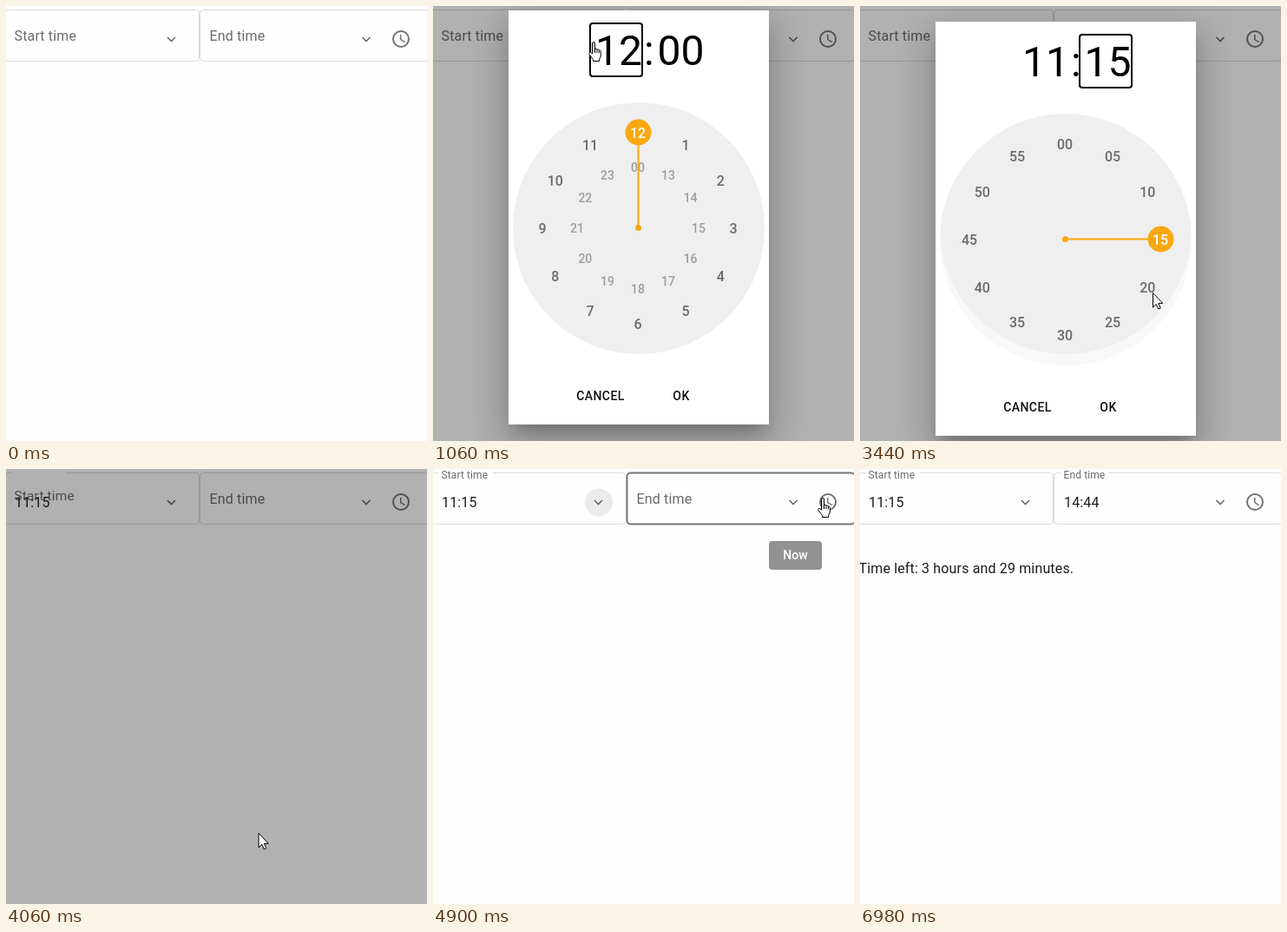
An HTML page that plays this animation: 485 px wide and 501 px high, repeating every 7530 ms.

```html
<!DOCTYPE html>
<html lang="en">
<head>
<meta charset="utf-8">
<title>Time range picker</title>
<style>
  html, body { margin: 0; width: 100%; height: 100%; overflow: hidden; background: #fefefe; }
  svg { display: block; font-family: Roboto, Arial, sans-serif; }
  .mid { text-anchor: middle; font-weight: 500; }
  .body { font-size: 16px; letter-spacing: .15px; fill: #1c1c1c; }
  .label { font-size: 16px; letter-spacing: .15px; fill: #6b6b6b; }
  .button { font-size: 14px; letter-spacing: .4px; fill: #111; }
  .digits { font-size: 48px; fill: #000; }
</style>
</head>
<body>
<svg id="stage" width="485" height="501" viewBox="0 0 485 501">
  <clipPath id="lens"><circle id="lensDisc" cx="237" r="145"/></clipPath>
  <rect width="485" height="501" fill="#fefefe"/>
  <g id="fields"></g>
  <g id="clockIcon" fill="#737373" transform="translate(443 26)">
    <circle cx="12" cy="12" r="9" fill="none" stroke="#737373" stroke-width="2"/>
    <path d="M12.5 7H11v6l5.25 3.15.75-1.23-4.5-2.67z"/>
  </g>
  <text id="result" class="body" x="-1.5" y="120">Time left: 3 hours and 29 minutes.</text>
  <g id="tooltip">
    <rect x="387" y="83" width="61" height="33" rx="4" fill="#616161" fill-opacity=".92"/>
    <text class="mid" x="417.5" y="104" font-size="14" fill="#fff">Now</text>
  </g>
  <rect id="backdrop" width="485" height="501" fill="#000"/>
  <g id="dialog">
    <g id="shadows"></g>
    <rect x="87" y="18" width="300" height="477" fill="#fff"/>
    <g class="digits">
      <text id="hours" x="187" y="81"></text>
      <text x="243" y="81">:</text>
      <text id="minutes" x="258.5" y="81"></text>
    </g>
    <rect id="focus" y="33" width="60" height="61" rx="3" fill="none" stroke="#000" stroke-width="2"/>
    <circle cx="237" cy="269" r="145" fill="#f8f8f8"/>
    <circle cx="237" cy="269" r="145" fill="#efefef" clip-path="url(#lens)"/>
    <g id="hourFace"></g>
    <g id="minuteFace"></g>
    <g id="hand" fill="#f9a811">
      <circle r="3.5"/>
      <rect x="-1" y="-96" width="2" height="96"/>
      <circle cy="-110" r="15"/>
    </g>
    <text id="picked" class="mid" font-size="16" fill="#fff"></text>
    <text class="mid button" x="193" y="467">CANCEL</text>
    <text class="mid button" x="286" y="467">OK</text>
  </g>
  <g id="cursor" fill="#fff" stroke="#000" stroke-linejoin="round">
    <path id="arrow" d="M.5.5V17L4.3 13.5 6.8 19 9.2 18 6.8 12.4H11.8z"/>
    <path id="pointer" transform="translate(-6 0)" d="M4.5 14V2a1.5 1.5 0 0 1 3 0V9c.4-1.2 2.3-1 2.4.5.5-1 2.3-.7 2.4.8.7-.8 2-.3 2 1V17l-1.6 3v2.5H5.4V20.4L1 14.6c-.9-1.9 1.1-3 2.2-1.6zM7.5 9v4M9.9 9.5v3.5M12.3 10.3v3"/>
  </g>
</svg>
<script>
const LOOP = 7530;
const CENTER = { x: 236, y: 269 };
const SVG = "http://www.w3.org/2000/svg";
const $ = id => document.getElementById(id);

function add(parent, tag, attrs, text = "") {
  const node = document.createElementNS(SVG, tag);
  set(node, attrs);
  node.textContent = text;
  return parent.appendChild(node);
}
function set(node, attrs) {
  for (const key in attrs) node.setAttribute(key, attrs[key]);
}
const show = (node, on) => set(node, { visibility: on ? "visible" : "hidden" });
const mix = (a, b, k) => a + (b - a) * k;
const ramp = (t, from, to) => Math.min(1, Math.max(0, (t - from) / (to - from)));
const ease = k => k * k * (3 - 2 * k);
const between = (t, from, to) => t >= from && t < to;

function polar(degrees, radius) {
  const a = degrees * Math.PI / 180;
  return { x: CENTER.x + radius * Math.sin(a), y: CENTER.y - radius * Math.cos(a) };
}

function makeField(x, width, name, value) {
  const g = add($("fields"), "g", {});
  const textX = x + 11.5;
  const border = add(g, "rect", { x, y: 4.5, width, height: 59, rx: 4, fill: "none" });
  const notch = add(g, "rect", { x: textX - 4, y: 2, width: name === "Start time" ? 63 : 55, height: 5, fill: "#fefefe" });
  const label = add(g, "text", { class: "label" }, name);
  const text = add(g, "text", { class: "body", x: textX, y: 44 }, value);
  const arrowX = name === "Start time" ? 190.5 : 415;
  const halo = add(g, "circle", { cx: arrowX + .5, cy: 38.5, r: 16, fill: "#ebebeb" });
  add(g, "path", { d: `M${arrowX - 4.5} 36l4.5 4.5 4.5-4.5`, fill: "none", stroke: "#6b6b6b", "stroke-width": 1.6 });
  return (filled, shrink, hover, haloAlpha) => {
    set(border, { stroke: hover ? "#777" : "#dadada", "stroke-width": hover ? 2 : 1 });
    show(notch, shrink > 0);
    show(text, filled);
    set(label, { transform: `translate(${textX - .5} ${mix(40, 11, shrink)}) scale(${mix(1, .75, shrink)})` });
    set(halo, { opacity: haloAlpha });
  };
}

function makeNumbers(face, radius, size, fill, name) {
  for (let i = 0; i < 12; i++) {
    const p = polar(i * 30, radius);
    add(face, "text", { class: "mid", x: p.x, y: p.y + size * .36, "font-size": size, fill }, name(i));
  }
}

const pad = n => String(n).padStart(2, "0");
const startField = makeField(-1.5, 224, "Start time", "11:15");
const endField = makeField(223.5, 262.5, "End time", "14:44");
makeNumbers($("hourFace"), 110, 16, "#6b6b6b", i => i || 12);
makeNumbers($("hourFace"), 70, 14, "#9d9d9d", i => i ? i + 12 : "00");
makeNumbers($("minuteFace"), 110, 16, "#6b6b6b", i => pad(i * 5));

// Each shadow: vertical offset, blur, spread, opacity
for (const [dy, blur, spread, alpha] of [[11, 15, -7, .2], [24, 38, 3, .14], [9, 46, 8, .12]]) {
  add($("shadows"), "rect", {
    x: 87 - spread, y: 18 + dy - spread, width: 300 + 2 * spread, height: 477 + 2 * spread,
    opacity: alpha, style: `filter: blur(${blur / 2}px)`
  });
}

// Cursor path: time, x, y
const path = [
  [70, 454, 443], [760, 190, 37], [840, 190, 37], [1060, 185, 41], [1180, 186, 70],
  [1520, 185, 172], [2290, 185, 172], [2750, 357, 271], [3060, 357, 271], [3440, 337, 330],
  [3680, 267, 468], [3830, 267, 468], [4210, 306, 387], [4520, 385, 184], [4800, 447, 38],
  [4900, 449, 33], [5620, 449, 33], [6140, 430, 109], [6500, 440, 300], [6980, 452, 500]
];
function cursorAt(t) {
  const i = Math.max(1, path.findIndex(p => p[0] > t));
  const [a, b] = [path[i - 1], path[i]];
  const k = ramp(t, a[0], b[0]);
  return [mix(a[1], b[1], k), mix(a[2], b[2], k)];
}

function drawFields(t) {
  const startShrink = ease(ramp(t, 4020, 4200));
  const endShrink = ease(ramp(t, 5440, 5640));
  const halo = between(t, 690, 1600) ? ramp(t, 690, 800) : ramp(t, 4300, 4450) * (1 - ramp(t, 5440, 5640));
  startField(t >= 4020, startShrink, between(t, 690, 920), halo);
  endField(t >= 5440, endShrink, between(t, 4720, 5850), 0);
  show($("result"), t >= 5520);
  set($("tooltip"), { opacity: ramp(t, 4780, 4940) * (1 - ramp(t, 5760, 5920)) });
}

function drawDialog(t) {
  const open = ramp(t, 800, 1040);
  set($("backdrop"), { opacity: .305 * open * (1 - ramp(t, 4230, 4520)) });
  set($("dialog"), {
    opacity: open * (1 - ramp(t, 3800, 4040)),
    transform: `translate(0 ${t < 1375 ? -13 : 0})`
  });
  set($("lensDisc"), { cy: t < 1375 ? 269 : 256 });

  const minuteView = t >= 1760;
  const chosen = t >= 3060;
  $("hours").textContent = t < 1600 ? "12" : "11";
  $("minutes").textContent = chosen ? "15" : "00";
  set($("focus"), { x: minuteView ? 253 : 181 });
  set($("hourFace"), { opacity: minuteView ? 0 : 1 });
  set($("minuteFace"), { opacity: ramp(t, 1740, 1980) });

  let angle = t < 1600 ? 0 : -30;
  if (minuteView) angle = chosen ? 90 : mix(-30, 0, ease(ramp(t, 1760, 2060)));
  set($("hand"), { transform: `translate(${CENTER.x + .5} ${CENTER.y - .5}) rotate(${angle})` });
  const knob = polar(angle, 110);
  set($("picked"), { x: knob.x, y: knob.y + 5.8 });
  $("picked").textContent = minuteView ? (chosen ? "15" : "00") : (t < 1600 ? "12" : "11");
}

function drawCursor(t) {
  const [x, y] = cursorAt(t);
  const onButton = between(t, 690, 1200) || between(t, 3620, 3980) || between(t, 4760, 5780);
  show($("cursor"), between(t, 70, 6980));
  set($("cursor"), { transform: `translate(${x} ${y})` });
  set($("arrow"), { display: onButton ? "none" : "inline" });
  set($("pointer"), { display: onButton ? "inline" : "none" });
}

let origin;
function frame(now) {
  origin ??= now;
  const t = (now - origin) % LOOP;
  drawFields(t);
  drawDialog(t);
  drawCursor(t);
  requestAnimationFrame(frame);
}
requestAnimationFrame(frame);
</script>
</body>
</html>
```
